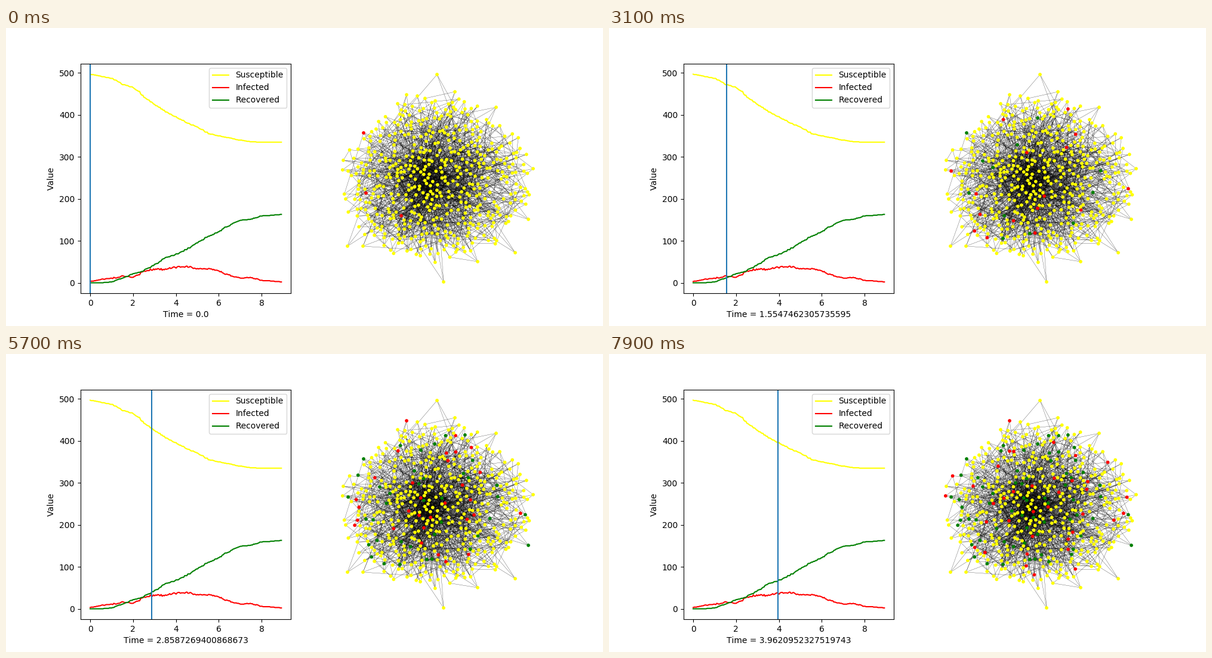
Animation of 1000x500 px, one loop 8000 ms. Source, as a matplotlib script:

```python
import numpy as np
import matplotlib.pyplot as plt
from matplotlib.animation import FuncAnimation
from matplotlib.collections import LineCollection

N = 500
FRAMES, STEP_MS = 80, 100
DT = 0.050153104212050306
CORE = (711, 268)
rng = np.random.default_rng(11)

# Counts at every half time unit from 0 to 9
SUSCEPTIBLE = [497, 492, 487, 473, 466, 444, 425, 409, 395, 382,
               371, 356, 350, 345, 340, 336, 335, 335, 335]
RECOVERED = [0, 0, 2, 11, 21, 29, 43, 59, 67, 80,
             95, 110, 122, 137, 149, 151, 159, 161, 163]

# First infected nodes, in order, and the nodes that stick out of the cloud
FIRST = [(599, 176), (603, 277), (662, 315), (643, 234), (660, 353),
         (718, 151), (684, 196), (626, 223)]
OUTER = [(722, 78), (733, 426), (572, 366), (853, 377), (752, 107),
         (671, 112), (689, 114), (656, 127), (821, 133), (844, 193),
         (861, 202), (875, 321), (598, 366), (790, 392), (565, 222),
         (883, 236)]


def stepped(values):
    """Whole-number curve through the half-unit values, slightly jagged."""
    knots = np.arange(len(values)) / 2
    jitter = rng.normal(0, 0.04, times.size)
    jitter[0] = 0
    curve = np.sort(np.round(np.interp(times + jitter, knots, values)))
    return curve if values[0] < values[-1] else curve[::-1]


def scatter_nodes():
    """Oval cloud with a ragged edge, denser in the middle."""
    pts = FIRST + OUTER
    while len(pts) < N:
        a = rng.uniform(0, 2 * np.pi)
        r = rng.random() ** 0.6 * rng.normal(1, 0.05)
        p = (723 + 156 * r * np.cos(a), 256 + 131 * r * np.sin(a))
        if min(np.hypot(p[0] - x, p[1] - y) for x, y in pts) > 5:
            pts.append(p)
    rest = rng.permutation(pts[len(FIRST):])
    return np.vstack([FIRST, rest])


def link_nodes(pos, m=3):
    """Grow links outwards from the core, preferring busy, nearby nodes."""
    core = np.hypot(*(pos - CORE).T)
    p = pos[np.argsort(core + rng.normal(0, 20, N))]
    deg = np.ones(N)
    links = []
    for i in range(m, N):
        dist = np.hypot(*(p[:i] - p[i]).T)
        w = deg[:i] * np.exp(-dist / 90)
        for j in rng.choice(i, m, replace=False, p=w / w.sum()):
            links.append((p[i], p[j]))
            deg[[i, j]] += 1
    return links


times = np.arange(179) * DT
sus = stepped(SUSCEPTIBLE)
rec = stepped(RECOVERED)
pos = scatter_nodes()

plt.rcParams["font.family"] = "DejaVu Sans"
plt.rcParams["text.kerning_factor"] = 6
fig, (ax, spare) = plt.subplots(1, 2, figsize=(10, 5), dpi=100)
spare.remove()
for data, color, label in ((sus, "yellow", "Susceptible"),
                           (N - sus - rec, "red", "Infected"),
                           (rec, "green", "Recovered")):
    ax.plot(times, data, color=color, label=label)
ax.set_ylabel("Value")
ax.legend(loc="upper right")
ax.set_xlim(ax.get_xlim())
ax.set_ylim(ax.get_ylim())
cursor = ax.axvline(0, color="#1f77b4")

net = fig.add_axes([0, 0, 1, 1])
net.set_xlim(0, 1000)
net.set_ylim(500, 0)
net.axis("off")
net.add_collection(LineCollection(link_nodes(pos), colors="black",
                                  linewidths=0.2, zorder=1))
dots = net.scatter(*pos.T, s=17, linewidths=0, zorder=2)


def draw(k):
    t = float(k * DT)
    cursor.set_xdata([t, t])
    ax.set_xlabel(f"Time = {t}")
    # Nodes are stored in order of infection and recover in the same order
    ill, well = int(N - sus[k]), int(rec[k])
    dots.set_facecolor(["green"] * well + ["red"] * (ill - well)
                       + ["yellow"] * (N - ill))
    return cursor, dots


anim = FuncAnimation(fig, draw, frames=FRAMES, interval=STEP_MS, repeat=True,
                     repeat_delay=0, blit=False)
plt.show()
```
